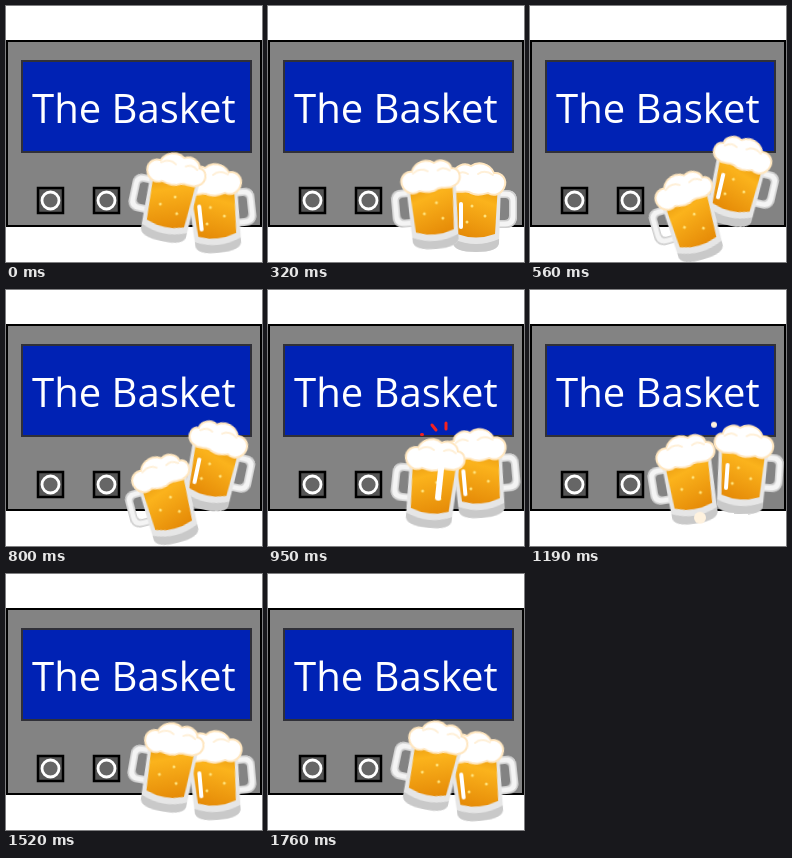
An HTML page for the animation above (1790 ms loop, 256 by 256 pixels).

```html
<!DOCTYPE html>
<html lang="en">
<head>
<meta charset="utf-8">
<title>The Basket</title>
<style>
  html, body { margin: 0; width: 100%; height: 100%; overflow: hidden; background: #fff; }
  svg { display: block; width: 100vw; height: 100vh; }
  .label { font: 500 40px "Open Sans", "Noto Sans", sans-serif; fill: #fff; }

  /* Rest, lift, swing apart, clink, rebound, settle */
  #left, #right { animation: left 1790ms ease-in-out infinite; }
  #right { animation-name: right; }
  @keyframes left {
    0%, 14.5%, 100% { transform: translate(164px, 196px) rotate(12deg); }
    18% { transform: translate(165px, 203px) rotate(-5deg); }
    31%, 43% { transform: translate(162px, 215px) rotate(-16deg); }
    53% { transform: translate(164px, 198px) rotate(6deg); }
    66.5% { transform: translate(160px, 194px) rotate(-9deg); }
    85% { transform: translate(163px, 198px) rotate(10deg); }
  }
  @keyframes right {
    0%, 14.5%, 100% { transform: translate(209px, 207px) rotate(-6deg); }
    18% { transform: translate(208px, 206px) rotate(0deg); }
    31%, 43% { transform: translate(206px, 180px) rotate(13deg); }
    53% { transform: translate(211px, 188px) rotate(-5deg); }
    66.5% { transform: translate(212px, 184px) rotate(4deg); }
    85% { transform: translate(209px, 206px) rotate(-5deg); }
  }

  .clink { opacity: 0; animation: clink 1790ms step-end infinite; }
  @keyframes clink {
    51% { opacity: 1; }
    58% { opacity: 0; }
  }
  .drop { opacity: 0; animation: show 1790ms step-end infinite, fall 1790ms ease-in infinite; }
  @keyframes show {
    61% { opacity: 1; }
    72% { opacity: 0; }
  }
  @keyframes fall {
    0%, 61% { transform: translateY(-4px); }
    72%, 100% { transform: translateY(14px); }
  }
</style>
</head>
<body>
<svg viewBox="0 0 256 256">
  <defs>
    <linearGradient id="beer" x1=".3" x2=".6" y2="1">
      <stop offset="0" stop-color="#e89a10"/>
      <stop offset=".3" stop-color="#fbb31c"/>
      <stop offset="1" stop-color="#e68c08"/>
    </linearGradient>

    <g id="mug">
      <g id="handle" fill="none">
        <path id="grip" d="M-22-18H-30Q-37-18-37-11V4Q-37 12-29 12H-20" stroke="#cfcfcf" stroke-width="8"/>
        <use href="#grip"/>
        <path d="M-22-18H-30Q-37-18-37-11V4Q-37 12-29 12H-20" stroke="#f4f4f4" stroke-width="5"/>
      </g>
      <path d="M-25-28L-23 31Q-22 40 0 40Q22 40 23 31L25-28Z" fill="#e6e6e6"/>
      <path d="M-23 27Q0 37 23 27V31Q22 40 0 40Q-22 40-23 31Z" fill="#c9c9c9"/>
      <path d="M-22-28L-19 22Q0 29 19 22L22-28Z" fill="url(#beer)"/>
      <g fill="#ffe27a">
        <circle cx="-9" cy="4" r="1.500"/>
        <circle cx="4" cy="-6" r="1.500"/>
        <circle cx="9" cy="10" r="1.500"/>
      </g>
      <path d="M-28-24C-32-32-26-40-18-39C-14-49-2-51 5-46C12-50 21-46 22-39C29-39 32-30 27-24C20-17 12-22 7-20C0-15-8-18-12-19C-18-15-25-18-28-24Z"
            fill="#fff" stroke="#ffe6bf" stroke-width="2"/>
      <path d="M-17-37Q-9-43-2-38M8-38Q14-42 20-37" fill="none" stroke="#fff0d8" stroke-width="2" stroke-linecap="round"/>
    </g>

    <g id="knob">
      <rect x="-12.500" y="-12.500" width="25" height="25" fill="#555" stroke="#000" stroke-width="2.500"/>
      <circle r="8.500" fill="#666" stroke="#fff" stroke-width="2.800"/>
    </g>
  </defs>

  <rect width="256" height="256" fill="#fff"/>
  <rect x="1" y="35" width="254" height="185" fill="#838383" stroke="#000" stroke-width="2"/>
  <rect x="16" y="55" width="229" height="91" fill="#0022b4" stroke="#303038" stroke-width="2"/>
  <text class="label" x="26" y="117">The Basket</text>
  <use href="#knob" x="44.500" y="194.500"/>
  <use href="#knob" x="100.500" y="194.500"/>

  <g id="right">
    <use href="#mug" transform="scale(-1 1)"/>
    <path d="M-15-8V15" stroke="#fff" stroke-width="4" stroke-linecap="round"/>
  </g>
  <g id="left">
    <use href="#mug"/>
    <path class="clink" d="M7-22V9" stroke="#fff" stroke-width="6" stroke-linecap="round"/>
  </g>

  <path class="clink" d="M153.500 144.500h1M164 135l4 5M178 133v6" stroke="#f32222" stroke-width="3" stroke-linecap="round"/>
  <g fill="#fff2de">
    <circle class="drop" cx="184" cy="133" r="3"/>
    <circle class="drop" cx="170" cy="226" r="6"/>
  </g>
</svg>
</body>
</html>
```
